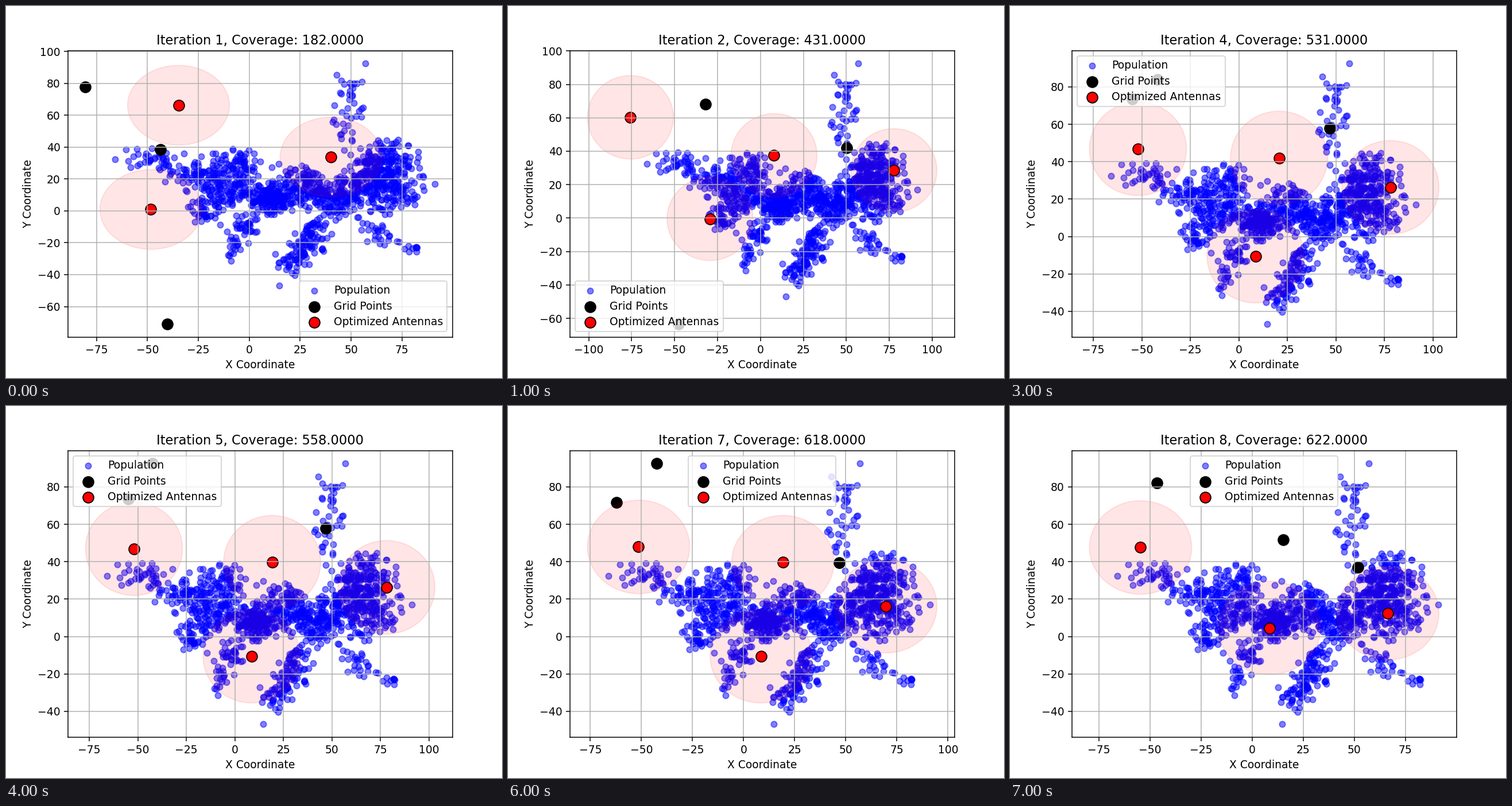
A matplotlib script for the animation above (8000 ms loop, 864x648 px).

```python
import matplotlib.pyplot as plt
import numpy as np
from matplotlib.animation import FuncAnimation

RADIUS = 25

# outermost people, which set the axis limits
CORNERS = [(57, 92.4), (91.2, 17), (14.7, -46.8), (-66, 32.3)]

# settled strips: start, end, half-width, head count
STRIPS = [
    ((51, 83), (46, 42), 9, 40),
    ((-56, 36), (-28, 24), 10, 62),
    ((-27, 20), (-2, 12), 13, 115),
    ((-16, 29), (6, 28), 11, 80),
    ((-24, -2), (-14, 6), 10, 58),
    ((4, 6), (18, 11), 12, 200),
    ((24, 22), (36, 6), 12, 120),
    ((36, 2), (58, 18), 14, 155),
    ((62, 20), (70, 32), 18, 240),
    ((60, 4), (78, 12), 13, 70),
    ((57, -11), (68, -15), 9, 26),
    ((76, -24), (84, -25), 3, 9),
    ((0, -4), (-8, -28), 8, 50),
    ((34, -8), (20, -34), 10, 110),
]


def make_population():
    rng = np.random.default_rng(7)
    groups = [np.array(CORNERS)]
    for start, end, width, count in STRIPS:
        along = rng.uniform(0, 1, (count, 1))
        centre = np.array(start) * (1 - along) + np.array(end) * along
        groups.append(centre + rng.triangular(-width, 0, width, (count, 2)))
    return np.vstack(groups)


def generations():
    """Yield coverage, legend place, grid points and antennas in turn."""
    yield (182, "lower right",
           [(-80.4, 77.9), (-43.6, 38.7), (-40.2, -71)],
           [(-34.7, 66.3), (-48.3, 0.9), (40.2, 33.8)])
    yield (431, "lower left",
           [(-32.1, 68.2), (50.3, 41.9), (-47.8, -63.4)],
           [(-75.7, 60.3), (7.9, 37.5), (77.7, 28.5), (-29.4, -0.4)])
    yield (440, "lower left",
           [(-73.3, 70), (-42, 83.9), (20.7, 37.4)],
           [(-48.1, 46), (43.1, 55.9), (13.2, 5.4), (73.9, -20.3)])

    # from here on most sites are kept and only a few move
    grid = [(46.7, 57.9), (-42, 83.9), (-55, 73.4)]
    antennas = [(-52, 46.9), (20.7, 42), (78.1, 26.3), (8.6, -10.5)]
    yield 531, "upper left", grid[:], antennas[:]

    grid[1] = (-42.4, 92.4)
    antennas[1] = (19.2, 39.7)
    yield 558, "upper left", grid[:], antennas[:]

    grid[2] = (-62.2, 71.7)
    antennas[0] = (-51.4, 47.9)
    antennas[2] = (69.6, 26.3)
    yield 597, "upper center", grid[:], antennas[:]

    grid[0] = (46.7, 39.3)
    antennas[2] = (69.6, 16.2)
    yield 618, "upper center", grid[:], antennas[:]

    yield (622, "upper center",
           [(-46.5, 82), (15.1, 51.6), (51.8, 37)],
           [(-54.6, 47.6), (8.5, 4.6), (66.4, 12.5)])


population = make_population()
steps = list(generations())
fig, ax = plt.subplots(figsize=(6.4, 4.8), dpi=135)


def update(step):
    coverage, place, grid, antennas = steps[step]
    ax.clear()
    ax.scatter(*population.T, s=30, c="blue", alpha=0.5, label="Population")
    ax.scatter(*zip(*grid), s=100, c="black", label="Grid Points")
    ax.scatter(*zip(*antennas), s=100, c="red", edgecolors="black",
               label="Optimized Antennas")
    for centre in antennas:
        ax.add_patch(plt.Circle(centre, RADIUS, color="red", alpha=0.1))
    ax.autoscale_view()
    ax.set_title(f"Iteration {step + 1}, Coverage: {coverage:.4f}")
    ax.set_xlabel("X Coordinate")
    ax.set_ylabel("Y Coordinate")
    ax.legend(loc=place, labelspacing=0.455, borderpad=0.38)
    ax.grid(True)


anim = FuncAnimation(fig, update, frames=len(steps), interval=1000,
                     repeat=True, repeat_delay=0)
plt.show()
```
